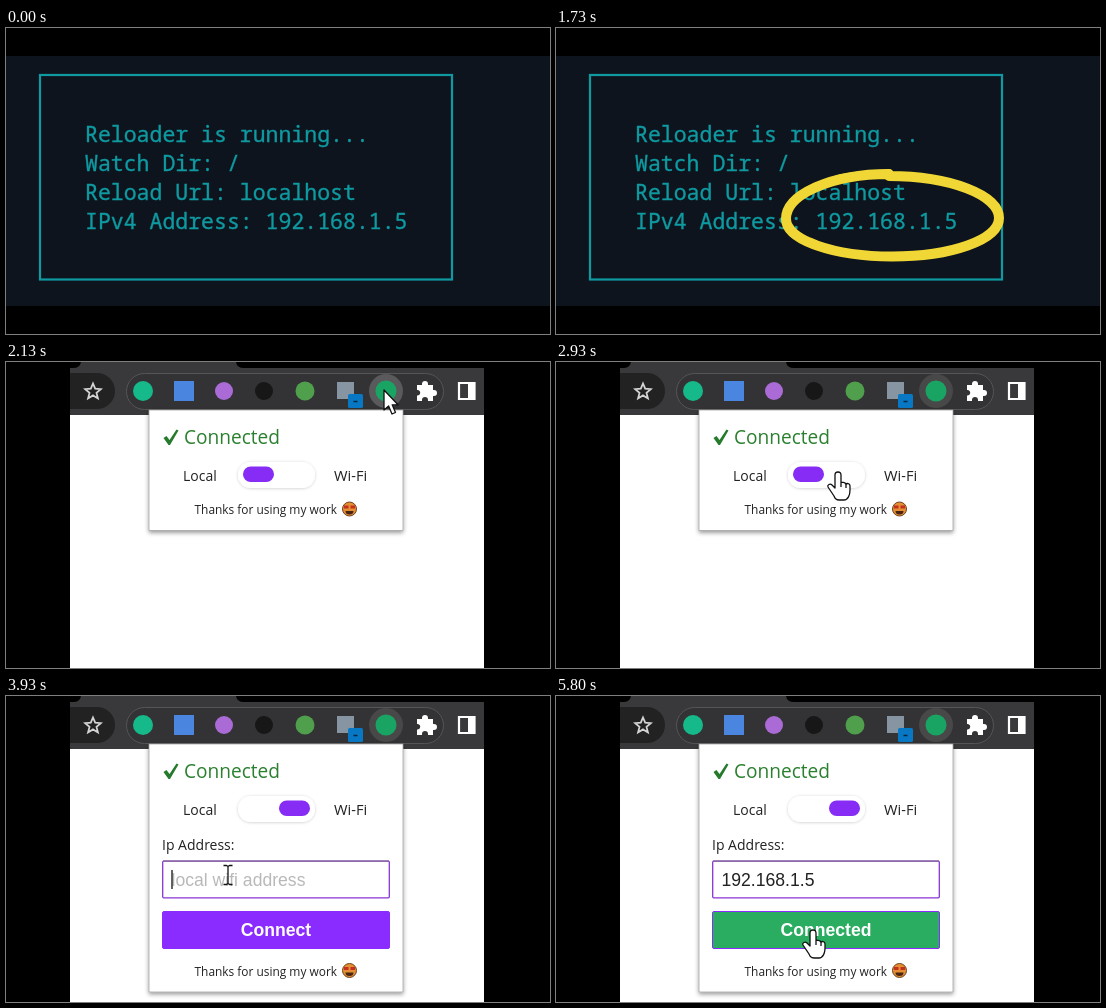
An HTML page that plays this animation: 544 by 306 pixels, repeating every 5870 ms.

```html
<!DOCTYPE html>
<html lang="en">
<head>
<meta charset="utf-8">
<title>Reloader over Wi-Fi</title>
<style>
html, body { margin: 0; height: 100%; overflow: hidden; background: #000; }
svg { display: block; width: 100vw; height: 100vh; }
.term { font: 500 21.5px "Noto Sans Mono", monospace; fill: #0f9aa1; stroke: #0f9aa1; stroke-width: .35; white-space: pre; }
.ui { font: 14px "Open Sans", "Noto Sans", sans-serif; fill: #222; }
.head { font-size: 19.1px; }
.small { font-size: 11.9px; }
.field { font: 17.6px "Liberation Sans", Arial, sans-serif; }
.btn { font: bold 17.6px "Liberation Sans", Arial, sans-serif; fill: #fff; text-anchor: middle; }
.pen { fill: none; stroke: #f0d735; stroke-linecap: round; }
.cursor { stroke: #111; stroke-width: 1.3; stroke-linejoin: round; fill: #fff; }
</style>
</head>
<body>
<svg viewBox="0 0 544 306">
  <defs>
    <filter id="shade" x="-10%" y="-10%" width="120%" height="125%">
      <feDropShadow dx="0" dy="2" stdDeviation="2" flood-opacity=".4"/>
    </filter>
    <filter id="soft" x="-10%" y="-25%" width="120%" height="150%">
      <feDropShadow dx="0" dy="0.5" stdDeviation="1.8" flood-opacity=".2"/>
    </filter>
    <filter id="blur"><feGaussianBlur stdDeviation=".5"/></filter>
  </defs>
  <rect width="544" height="306"/>

  <g id="terminal">
    <rect y="28" width="544" height="250" fill="#0d141d"/>
    <g filter="url(#blur)">
      <rect x="34" y="47" width="412" height="204.5" fill="none" stroke="#0f9aa1" stroke-width="2.2"/>
      <g class="term">
        <text x="79" y="113.5">Reloader is running...</text>
        <text x="79" y="142.5">Watch Dir: /</text>
        <text x="79" y="171.5">Reload Url: localhost</text>
        <text x="79" y="200.5">IPv4 Address: 192.168.1.5</text>
      </g>
    </g>
    <path id="ring" class="pen" stroke-width="10" pathLength="1" d="M333 146C276 146 230 166 230 191C230 212 278 228.500 336 228.500C395 228.500 443 212 443 190C443 167 394 148 333 148"/>
    <path id="tail" class="pen" stroke-width="3" pathLength="1" d="M334 143Q300 144 280 149"/>
  </g>

  <g id="browser">
    <rect x="64" width="414" height="306" fill="#fff"/>
    <rect x="64" width="414" height="53" fill="#39393b"/>
    <path d="M64 0H75Q74 6 67 6H64ZM230 0Q231 6 238 6H478V0Z"/>
    <path d="M64 11H91a18 18 0 0 1 0 36H64Z" fill="#222223"/>
    <path d="M87 21.5l2.2 5.2 5.6.5-4.3 3.7 1.4 5.5-4.9-3-4.9 3 1.4-5.5-4.3-3.700 5.600-.5Z" fill="none" stroke="#d4d4d4" stroke-width="1.8"/>
    <rect x="120.5" y="11.5" width="317" height="36" rx="18" fill="#333335" stroke="#555557"/>
    <circle cx="137" cy="29" r="10" fill="#16b98a"/>
    <rect x="168" y="19" width="20" height="20" fill="#4a86e0"/>
    <circle cx="218" cy="29" r="9" fill="#ab6bd6"/>
    <circle cx="258" cy="29" r="9" fill="#171718"/>
    <circle cx="299" cy="29" r="9.5" fill="#4f9f4c"/>
    <rect x="331" y="20" width="17" height="17" fill="#8795a2"/>
    <rect x="342" y="32" width="15" height="14" rx="1.5" fill="#0878c4"/>
    <path d="M347.5 39.5h4" stroke="#06263d" stroke-width="1.5"/>
    <circle id="glow" cx="380" cy="29" r="17"/>
    <circle id="icon" cx="380" cy="29" r="10.5"/>
    <path d="M411 23h5v-1a3 3 0 0 1 6 0v1h5v5h1a3 3 0 0 1 0 6h-1v5h-5v-1a3 3 0 0 0-6 0v1h-5v-5.500h1a2.800 2.800 0 0 0 0-5.500h-1Z" fill="#fff"/>
    <path d="M453 21h15.500v16H453Z" fill="none" stroke="#fff" stroke-width="2.2"/>
    <path d="M462 20h7v18h-7Z" fill="#fff"/>

    <g id="popup" class="ui">
      <rect id="panel" x="143" y="48" width="254" fill="#fff" stroke="#999" stroke-width=".7" filter="url(#shade)"/>
      <path id="check" d="M157.5 76l3-2 3 4 7-10.500 2 1L164 83h-1.500Z" fill="#257a2c"/>
      <path id="cross" d="M159 69.500L170.500 81M170.500 69.500L159 81" stroke="#df2626" stroke-width="2.6"/>
      <text id="status" class="head" x="178" y="82"></text>
      <text x="177" y="119">Local</text>
      <text x="328" y="119" font-size="14.6">Wi-Fi</text>
      <rect x="232" y="100" width="77" height="26" rx="13" fill="#fff" filter="url(#soft)"/>
      <rect id="thumb" y="104.5" width="31" height="15.5" rx="7.7" fill="#862cf5"/>
      <g id="form">
        <text x="156" y="154">Ip Address:</text>
        <rect id="box" x="156.7" y="165.2" width="226.6" height="36.6" rx="1" fill="#fff" stroke-width="1.3"/>
        <path d="M157 165H383" stroke="#77687f"/>
        <text id="value" class="field" x="165.5" y="190"></text>
        <path id="caret" d="M166 174V193" stroke="#111" stroke-width="1.3"/>
        <rect id="button" x="156.5" y="215.5" width="227" height="37" rx="1.5" stroke="#8a2cff"/>
        <text id="label" class="btn" x="270" y="240"></text>
      </g>
      <g id="thanks">
        <text class="small" x="188.5" y="152">Thanks for using my work</text>
        <circle cx="343.5" cy="147" r="7" fill="#e58f32" stroke="#6b4220"/>
        <path d="M338 145h4.500M344.500 145h4.500" stroke="#c4301f" stroke-width="3.2"/>
        <path d="M339.500 149h8a4 3.500 0 0 1-8 0Z" fill="#4a2413"/>
      </g>
    </g>

    <g id="pointer" class="cursor">
      <path id="arrow" d="M0 0V20L4.600 16L8 24L11.500 22.500L8.200 14.800H14Z"/>
      <path id="hand" d="M0 0C-2 0-3 1-3 3V16L-6 13C-8 11-11 13-10 15L-4 24C-3 27-1 28 1 28H6C10 28 12 23 12 18V14C12 11 8.500 11 8 12.500C7.500 10 3 10 3 11V3C3 1 2 0 0 0ZM3 11V15M8 12.500V16"/>
      <path id="beam" fill="none" d="M-4.500 -9.500H-1.500L0 -8.500L1.500 -9.500H4.500M0 -8.500V8.500M-4.500 9.500H-1.500L0 8.500L1.500 9.500H4.500"/>
    </g>
  </g>
</svg>
<script>
const LOOP = 5870, STEP = 1000 / 15;
const $ = id => document.getElementById(id);
const set = (id, attrs) => { for (const k in attrs) $(id).setAttribute(k, attrs[k]); };
const show = (id, on) => { $(id).style.display = on ? '' : 'none'; };
const part = (t, a, b) => Math.min(1, Math.max(0, (t - a) / (b - a)));
const ease = p => p * p * (3 - 2 * p);

// Pointer stops: time, x, y
const stops = [
  [1800, 408, 84], [1980, 378, 28], [2400, 378, 28], [2900, 282, 110],
  [3270, 282, 110], [3720, 222, 179], [4200, 222, 179], [4730, 257, 234], [LOOP, 257, 234]
];

function pointerAt(t) {
  const i = Math.max(1, stops.findIndex(s => s[0] >= t));
  const [a, x, y] = stops[i - 1], [b, u, v] = stops[i];
  const p = ease(part(t, a, b));
  return [x + (u - x) * p, y + (v - y) * p];
}

function draw(id, p) {
  show(id, p > 0);
  set(id, { 'stroke-dasharray': `${p} 2` });
}

function render(t) {
  const terminal = t < 1790;
  show('terminal', terminal);
  show('browser', !terminal);
  if (terminal) {
    draw('ring', part(t, 60, 1600));
    draw('tail', part(t, 1600, 1725));
    return;
  }

  const opened = t > 1990, wifi = t > 3190, pasted = t > 4060;
  const lost = t > 4860 && t < 5260, done = t > 5260, focused = t > 3720;

  show('popup', opened);
  show('glow', opened);
  set('icon', { fill: lost ? '#ee964c' : '#19a463' });
  set('panel', { height: wifi ? 248 : 120.5 });
  set('thanks', { transform: `translate(0 ${wifi ? 127.5 : 0})` });
  set('thumb', { x: 237 + 36 * ease(part(t, 3130, 3400)) });
  show('check', !lost);
  show('cross', lost);
  $('status').textContent = lost ? 'Disconnected' : 'Connected';
  $('status').style.fill = lost ? '#df2626' : '#2b802f';

  show('form', wifi);
  set('box', { stroke: focused ? '#8a35d6' : '#888' });
  $('value').textContent = pasted ? '192.168.1.5' : 'local wifi address';
  $('value').style.fill = pasted ? '#222' : '#b9b9b9';
  show('caret', focused && !pasted);
  set('button', { fill: done ? '#2aad61' : '#8a2cff' });
  $('label').textContent = done ? 'Connected' : 'Connect';

  const [x, y] = pointerAt(t);
  const inside = (l, top, r, b) => x > l && x < r && y > top && y < b;
  const beam = wifi && inside(156, 165, 384, 202);
  const hand = inside(232, 100, 309, 126) || wifi && inside(156, 215, 384, 253);
  set('glow', { fill: inside(363, 12, 397, 46) ? '#5a5a5c' : '#484849' });
  set('pointer', { transform: `translate(${x} ${y})` });
  show('beam', beam);
  show('hand', hand);
  show('arrow', !beam && !hand);
}

const start = performance.now();
function tick() {
  const t = (performance.now() - start) % LOOP;
  render(Math.floor(t / STEP + 0.1) * STEP);
  requestAnimationFrame(tick);
}
tick();
</script>
</body>
</html>
```
